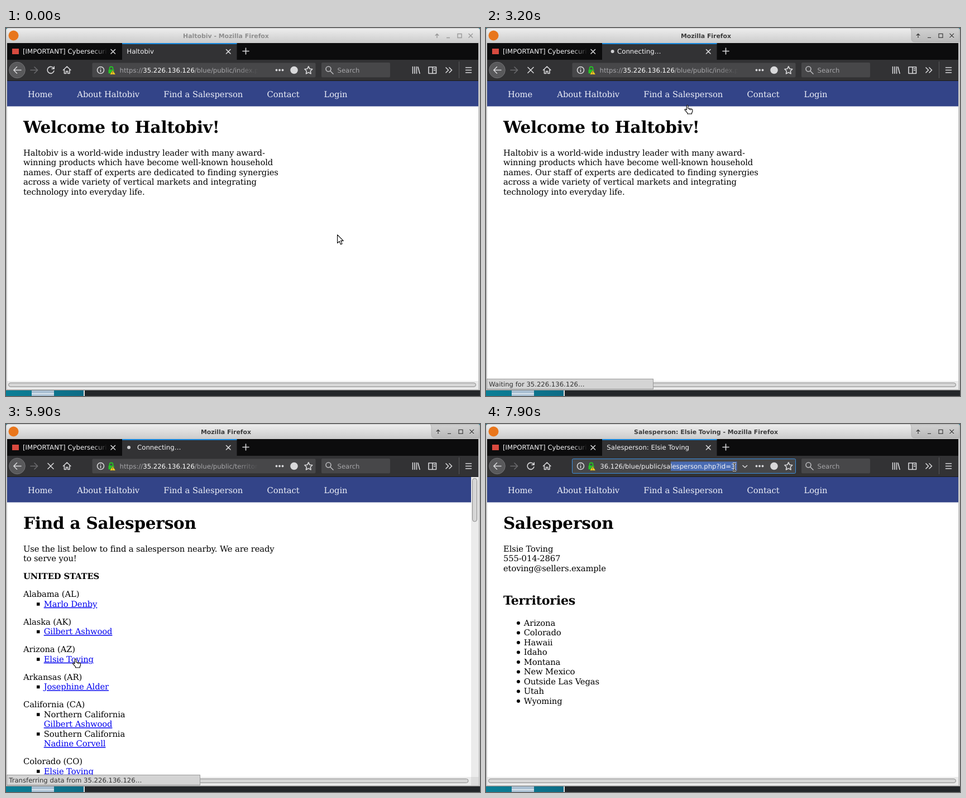
Write an HTML page that moves like this. It is 849 by 660 pixels and loops after 8000 ms.

```html
<!DOCTYPE html>
<html lang="en">
<head>
<meta charset="utf-8">
<title>Browser session</title>
<style>
html, body { margin: 0; width: 100%; height: 100%; overflow: hidden; background: #232629; }
svg { display: block; }
text { white-space: pre; text-rendering: geometricPrecision; }
.ui { font: 11.75px "DejaVu Sans", sans-serif; fill: #f4f4f6; }
.url { font-size: 11.65px; }
.dim { fill: #a6a6a9; }
.title { font: bold 10.9px "DejaVu Sans", sans-serif; text-anchor: middle; fill: #8e8e8e; }
.page { font: 14.74px "DejaVu Serif", serif; letter-spacing: -.12px; fill: #000; }
.nav { font: 14.74px "DejaVu Serif", serif; letter-spacing: -.06px; fill: #eef0f8; }
.h1, .h2 { font-weight: bold; letter-spacing: -.19px; }
.h1 { font-size: 29.47px; }
.h2 { font-size: 22.1px; }
.b { font-weight: bold; }
.link { fill: #00e; text-decoration: underline; }
.ico { fill: none; stroke: #d8d8da; stroke-width: 1.6; stroke-linecap: round; stroke-linejoin: round; }
.thumb { fill: #d6d6d6; stroke: #8b8b8b; }
.winbtn { fill: none; stroke: #9a9a9a; stroke-width: 1.4; }
.on .title { fill: #3c3c3c; }
.on .winbtn { stroke: #444; filter: drop-shadow(0 1px 0 #eee); }
.cur { fill: #fff; stroke: #000; stroke-width: 1.1; stroke-linejoin: round; }
</style>
</head>
<body>
<svg width="849" height="660" viewBox="0 0 849 660">
  <defs>
    <linearGradient id="bar" x2="0" y2="1"><stop stop-color="#ededed"/><stop offset="1" stop-color="#cbcbcb"/></linearGradient>
    <linearGradient id="btns" x2="0" y2="1"><stop stop-color="#d2d2d2"/><stop offset="1" stop-color="#b8b8b8"/></linearGradient>
    <linearGradient id="desk"><stop stop-color="#0b7f96"/><stop offset="1" stop-color="#0d6c86"/></linearGradient>
    <linearGradient id="tabFade" gradientUnits="userSpaceOnUse" x1="155" x2="182"><stop stop-color="#fff"/><stop offset="1" stop-color="#fff" stop-opacity="0"/></linearGradient>
    <linearGradient id="urlFade" gradientUnits="userSpaceOnUse" x1="412" x2="452"><stop stop-color="#fff"/><stop offset="1" stop-color="#fff" stop-opacity="0"/></linearGradient>
    <mask id="tabMask" maskUnits="userSpaceOnUse" x="0" y="27" width="200" height="30"><rect y="27" width="190" height="30" fill="url(#tabFade)"/></mask>
    <mask id="urlMask" maskUnits="userSpaceOnUse" x="200" y="60" width="260" height="30"><rect x="200" y="60" width="252" height="30" fill="url(#urlFade)"/></mask>
    <clipPath id="view"><rect x="2" y="95" width="844" height="538"/></clipPath>
    <clipPath id="field"><rect x="200" y="62" width="250" height="27"/></clipPath>
  </defs>

  <!-- desktop -->
  <rect width="849" height="660" fill="#232629"/>
  <rect width="849" height="12" fill="#0e7389"/>
  <rect y="640" width="139" height="20" fill="url(#desk)"/>
  <rect x="139" y="640" width="2" height="20" fill="#e4e4e4"/>
  <path d="M46 650h40v10h-40z" fill="#a9bfd2"/><path d="M46 655h40v2h-40z" fill="#dbe5ee"/>

  <!-- window -->
  <path d="M0 650V4q0-4 4-4H845q4 0 4 4V650Z" fill="#c6c6c6"/>
  <path d="M0 649.5H849" stroke="#8a8a8a"/>
  <g id="head">
    <path d="M1 27V4q0-3 3-3H845q3 0 3 3V27Z" fill="url(#bar)"/>
    <path id="btnBg" d="M760 1q2 1 2 5v13q0 6 6 6H848V4q0-3-3-3Z" fill="url(#btns)" stroke="#a2a2a2" stroke-width=".6"/>
    <circle cx="13.5" cy="13.5" r="9" fill="#e8761c"/>
    <text id="title" class="title" x="394" y="17.5"></text>
    <g id="winbtns" class="winbtn">
      <path d="M772 18v-7M768.8 13.8l3.2-3.3 3.2 3.3M789 17.5h6M809 10.5h7v7h-7zM828.5 10l7.5 7.5M836 10l-7.5 7.5"/>
    </g>
  </g>

  <!-- tabs -->
  <rect x="2" y="27" width="844" height="30" fill="#0c0c0d"/>
  <rect x="208" y="27" width="205.500" height="31" fill="#323234"/>
  <rect x="208" y="27" width="205.500" height="2" fill="#1486dd"/>
  <rect x="11" y="37" width="12" height="10" fill="#d94a3f"/>
  <text class="ui" x="30" y="46" mask="url(#tabMask)">[IMPORTANT] Cybersecurity</text>
  <circle id="busy" cx="223" cy="42" r="3" fill="#cfcfd2"/>
  <text id="tab" class="ui" y="46"></text>
  <path class="ico" d="M188 38.500l7.500 7.500M195.500 38.500l-7.500 7.500M394.500 38.500l7.500 7.500M402 38.500l-7.500 7.500M424 41.500h11M429.500 36v11"/>

  <!-- toolbar -->
  <rect x="2" y="57" width="844" height="38" fill="#323234"/>
  <rect x="2" y="94" width="844" height="1" fill="#1a1a1b"/>
  <circle cx="20" cy="75.500" r="14.300" fill="#59595b" stroke="#737376"/>
  <path class="ico" stroke-width="2" d="M27 75.500H14M19.500 69.800l-5.700 5.700 5.700 5.700"/>
  <path class="ico" style="stroke:#6b6b6e" d="M44 75.500h12.500M51 70l5.700 5.500-5.700 5.500"/>
  <path id="reload" class="ico" d="M85.300 72.300a6 6 0 1 0 .6 4.800M86.200 69.200v4h-4.200"/>
  <path id="stop" class="ico" d="M75 70.500l10 10M85 70.500l-10 10"/>
  <path class="ico" d="M102.500 75.500l6.700-6.500 6.700 6.500M104.500 75v6.500h3.200v-4h3v4h3.200V75"/>
  <rect id="box" x="154.500" y="62.500" width="400" height="26" rx="2" fill="#474749"/>
  <circle cx="169.500" cy="75.500" r="6" class="ico" stroke-width="1.200"/>
  <path class="ico" stroke-width="1.500" d="M169.500 75v3.500M169.500 72.300v.2"/>
  <path d="M185.500 75v-2.500a3 3 0 0 1 6 0V75" fill="none" stroke="#25c425" stroke-width="1.800"/>
  <rect x="183.500" y="74.500" width="10" height="7" rx="1" fill="#25c425"/>
  <path d="M191 75.500l5.300 8h-10.300z" fill="#ffd21a" stroke="#474749" stroke-width=".6"/>
  <path d="M191 78v2.500M191 81.500v1" stroke="#444" stroke-width="1.100"/>
  <g id="idle" mask="url(#urlMask)"><text class="ui url dim" x="203.500" y="80">https://<tspan fill="#fff">35.226.136.126</tspan>/blue/public/<tspan id="file"></tspan></text></g>
  <g id="edit" clip-path="url(#field)">
    <rect id="sel" y="67.500" height="16.500" fill="#4a6cb3"/>
    <text id="typed" class="ui url" x="204.300" y="80"></text>
  </g>
  <path id="chev" class="ico" stroke-width="1.300" d="M460 74.500l3.800 3.500 3.800-3.500"/>
  <g fill="#d8d8da"><circle cx="484.500" cy="75.500" r="1.900"/><circle cx="490" cy="75.500" r="1.900"/><circle cx="495.500" cy="75.500" r="1.900"/><circle cx="516" cy="75.500" r="6.800"/></g>
  <path class="ico" stroke-width="1.300" d="M541.800 68.800l2.100 4.400 4.800.6-3.500 3.400.9 4.800-4.300-2.400-4.300 2.400.9-4.800-3.500-3.400 4.800-.6z"/>
  <rect x="565" y="62" width="123" height="26.500" rx="2" fill="#474749"/>
  <circle cx="577.500" cy="73.500" r="4.500" class="ico" style="stroke:#b9b9bc"/><path class="ico" style="stroke:#b9b9bc" d="M581 77.200l5 5"/>
  <text class="ui url dim" x="593.500" y="80">Search</text>
  <path class="ico" stroke-width="1.500" d="M728.500 69.500v12M732 69.500v12M735.500 69.500v12M738 70l3 11.500M757 70h13.500v11.500H757zM764 70v11.500M766.500 73h2M766.500 76h2M788 71l4.500 4.500-4.500 4.500M794 71l4.500 4.500-4.500 4.500M823.500 71h10M823.500 75.500h10M823.500 80h10"/>
  <path d="M811.500 60v30" stroke="#59595b"/>

  <!-- page -->
  <rect x="2" y="95" width="844" height="538" fill="#fff"/>
  <rect x="2" y="95" width="844" height="45.500" fill="#348"/>
  <g class="nav">
    <text x="39" y="124">Home</text><text x="127.300" y="124">About Haltobiv</text>
    <text x="282.300" y="124">Find a Salesperson</text><text x="467.500" y="124">Contact</text><text x="569.500" y="124">Login</text>
  </g>
  <g class="page" clip-path="url(#view)"><g id="home"></g><g id="list"></g><g id="person"></g></g>

  <!-- scrollbars -->
  <rect x="2" y="633" width="844" height="15" fill="#ebebeb"/>
  <rect id="hThumb" class="thumb" x="4.500" y="636.500" height="7" rx="3.500"/>
  <g id="vBar">
    <rect x="833" y="95" width="13.500" height="538" fill="#ebebeb"/>
    <rect x="833" y="633" width="13.500" height="15" fill="#dcdcdc"/>
    <rect class="thumb" x="835.500" y="97.500" width="8" height="77.500" rx="4"/>
  </g>
  <g id="status">
    <rect id="statusBox" x="1.500" y="629.500" height="18" fill="#d4d4d4" stroke="#9a9a9a"/>
    <text id="statusText" class="ui url" style="fill:#333" x="5.300" y="642.500"></text>
  </g>

  <g id="cursor">
    <path id="arrow" class="cur" d="M.6 .8V15.800L4.100 12.600 6.500 18 9 16.900 6.700 11.600H11.300Z"/>
    <path id="hand" class="cur" d="M4 9V2q0-1.500 1.300-1.500T6.600 2V6.200l6.400 1q1.500.3 1.500 1.700V12l-1.300 2.300V16H5.500V14.300L.8 9.200q-.5-1.700 1.200-1.600Z M9 7v2M11.500 7.400v2"/>
    <g id="beam" fill="none"><path d="M1 .5q2.500 0 3 1.500.5-1.500 3-1.500M4 2V12M1 13.500q2.500 0 3-1.500.5 1.500 3 1.500" stroke="#fff" stroke-width="3"/><path d="M1 .5q2.500 0 3 1.500.5-1.500 3-1.500M4 2V12M1 13.500q2.500 0 3-1.500.5 1.500 3 1.500" stroke="#000" stroke-width="1.200"/></g>
  </g>
</svg>

<script>
const $ = id => document.getElementById(id);
const show = (id, on) => { $(id).style.display = on ? '' : 'none'; };
const LINE = 17.5, LEFT = 31, INDENT = 67.7;
const text = (x, y, s, cls = '') => `<text x="${x}" y="${y}" class="${cls}">${s}</text>`;
const para = (y, rows) => rows.map((s, i) => text(LEFT, y + i * LINE, s)).join('');

const firm = 'Haltobiv', who = 'Elsie Toving';
$('home').innerHTML = text(LEFT, 187.5, `Welcome to ${firm}!`, 'h1') + para(228.6, [
  `${firm} is a world-wide industry leader with many award-`,
  'winning products which have become well-known household',
  'names. Our staff of experts are dedicated to finding synergies',
  'across a wide variety of vertical markets and integrating',
  'technology into everyday life.']);

// Entries: state, then people, or [region, person] pairs
const states = [
  ['Alabama (AL)', 'Marlo Denby'],
  ['Alaska (AK)', 'Gilbert Ashwood'],
  ['Arizona (AZ)', who],
  ['Arkansas (AR)', 'Josephine Alder'],
  ['California (CA)', ['Northern California', 'Gilbert Ashwood'], ['Southern California', 'Nadine Corvell']],
  ['Colorado (CO)', who]];
let y = 310.3;
let html = text(LEFT, 187.5, 'Find a Salesperson', 'h1') +
  para(228.6, ['Use the list below to find a salesperson nearby. We are ready', 'to serve you!']) +
  text(LEFT, 278.3, 'UNITED STATES', 'b');
for (const [state, ...items] of states) {
  html += text(LEFT, y, state);
  for (const item of items) {
    const rows = [item].flat();
    html += `<rect x="55" y="${y + LINE - 7.5}" width="5.500" height="5.500"/>`;
    rows.forEach((s, i) => {
      y += LINE;
      html += text(INDENT, y, s, i === rows.length - 1 ? 'link' : '');
    });
  }
  y += 32;
}
$('list').innerHTML = html;

$('person').innerHTML = text(LEFT, 187.5, 'Salesperson', 'h1') +
  para(228.6, [who, '555-014-2867', 'etoving@sellers.example']) +
  text(LEFT, 324, 'Territories', 'h2') +
  ['Arizona', 'Colorado', 'Hawaii', 'Idaho', 'Montana', 'New Mexico', 'Outside Las Vegas', 'Utah', 'Wyoming']
    .map((s, i) => `<circle cx="58" cy="${357 + i * LINE}" r="3"/>` + text(INDENT, 361.8 + i * LINE, s)).join('');

const pages = [
  { id: 'home', from: 0, title: firm, file: 'index.php' },
  { id: 'list', from: 3300, title: 'Find a Salesperson', file: 'territories.php' },
  { id: 'person', from: 6100, title: 'Salesperson: ' + who, file: 'salesperson.php?id=3' }];

// time, x, y, pointer shape from that time on
const path = [
  [0, 593, 370, 'arrow'], [300, 593, 370], [500, 592, 386], [700, 572, 335], [1200, 491, 133], [1400, 491, 131],
  [1600, 506, 120, 'hand'], [1800, 572, 118], [2100, 486, 117], [2400, 406, 114], [3000, 406, 114],
  [3300, 330, 150, 'arrow'], [3400, 312, 168], [3500, 312, 168], [3700, 243, 240], [3800, 243, 240],
  [4200, 174, 342], [4300, 157, 358], [4400, 157, 358], [4600, 121, 394], [4700, 121, 394],
  [5000, 114, 407], [5200, 119, 420, 'hand'], [5400, 119, 421], [6000, 119, 421],
  [6200, 210, 261, 'arrow'], [6500, 210, 261], [6600, 437, 94], [6700, 420, 70, 'beam'], [7100, 560, 73],
  [7200, 560, 73], [7300, 564, 81, 'arrow'], [7400, 543, 81], [7500, 543, 81], [7800, 465, 77], [7900, 441, 70, 'beam'],
  [8000, 441, 70]];

const root = 'https://35.226.136.126/blue/public/';
const statuses = [
  [0, ''], [1600, root + 'contact.php', 277], [2300, root + 'territories.php', 298],
  [3100, 'Waiting for 35.226.136.126…', 298], [3300, ''],
  [5400, root + 'salesperson.php?id=3', 346], [5600, 'Waiting for 35.226.136.126…', 346],
  [5900, 'Transferring data from 35.226.136.126…', 346], [6100, '']];

const last = (rows, t, key = 0) => rows.filter(r => r[key] <= t).pop();
const within = (t, a, b) => t >= a && t < b;

function moveCursor(t) {
  const i = path.findIndex(p => p[0] > t);
  const [t0, x0, y0] = path[i - 1], [t1, x1, y1] = path[i];
  const k = (t - t0) / (t1 - t0);
  $('cursor').setAttribute('transform', `translate(${x0 + (x1 - x0) * k} ${y0 + (y1 - y0) * k})`);
  const shape = path.slice(0, i).filter(p => p[3]).pop()[3];
  for (const s of ['arrow', 'hand', 'beam']) show(s, s === shape);
}

function draw(now) {
  const t = Math.floor(now % 8000 / 100) * 100;
  const page = last(pages, t, 'from');
  const loading = within(t, 3100, 3300) || within(t, 5600, 6100);
  const active = t >= 2200;
  const scrolls = page.id === 'list';
  const focus = t >= 6700, scrolled = t >= 7000;

  for (const p of pages) show(p.id, p === page);
  $('head').setAttribute('class', active ? 'on' : '');
  show('btnBg', active);
  $('winbtns').setAttribute('transform', `translate(${active ? 2 : 0} 0)`);
  $('title').textContent = (loading ? '' : page.title + ' - ') + 'Mozilla Firefox';
  $('tab').textContent = loading ? 'Connecting…' : page.title;
  $('tab').setAttribute('x', loading ? 235 : 216.3);
  show('busy', loading);
  $('busy').setAttribute('cx', 223 + 4 * Math.sin(t / 160));
  show('reload', !loading);
  show('stop', loading);
  $('reload').style.stroke = within(t, 3300, 3700) || within(t, 6100, 6700) ? '#6b6b6e' : '';

  $('file').textContent = page.file;
  $('box').setAttribute('stroke', focus ? '#3b8fdf' : 'none');
  for (const id of ['edit', 'chev']) show(id, focus);
  show('idle', !focus);
  $('typed').textContent = scrolled ? '36.126/blue/public/salesperson.php?id=3' : root + page.file;
  $('sel').setAttribute('x', scrolled ? 331 : 424);
  $('sel').setAttribute('width', scrolled ? 118.5 : t > 6700 ? 26 : 0);

  show('vBar', scrolls);
  $('hThumb').setAttribute('width', scrolls ? 823.5 : 837);
  const [, msg, width] = last(statuses, t);
  show('status', msg);
  $('statusText').textContent = msg;
  $('statusBox').setAttribute('width', width || 0);
  moveCursor(t);
}

function tick() {
  draw(performance.now());
  requestAnimationFrame(tick);
}
tick();
</script>
</body>
</html>
```
